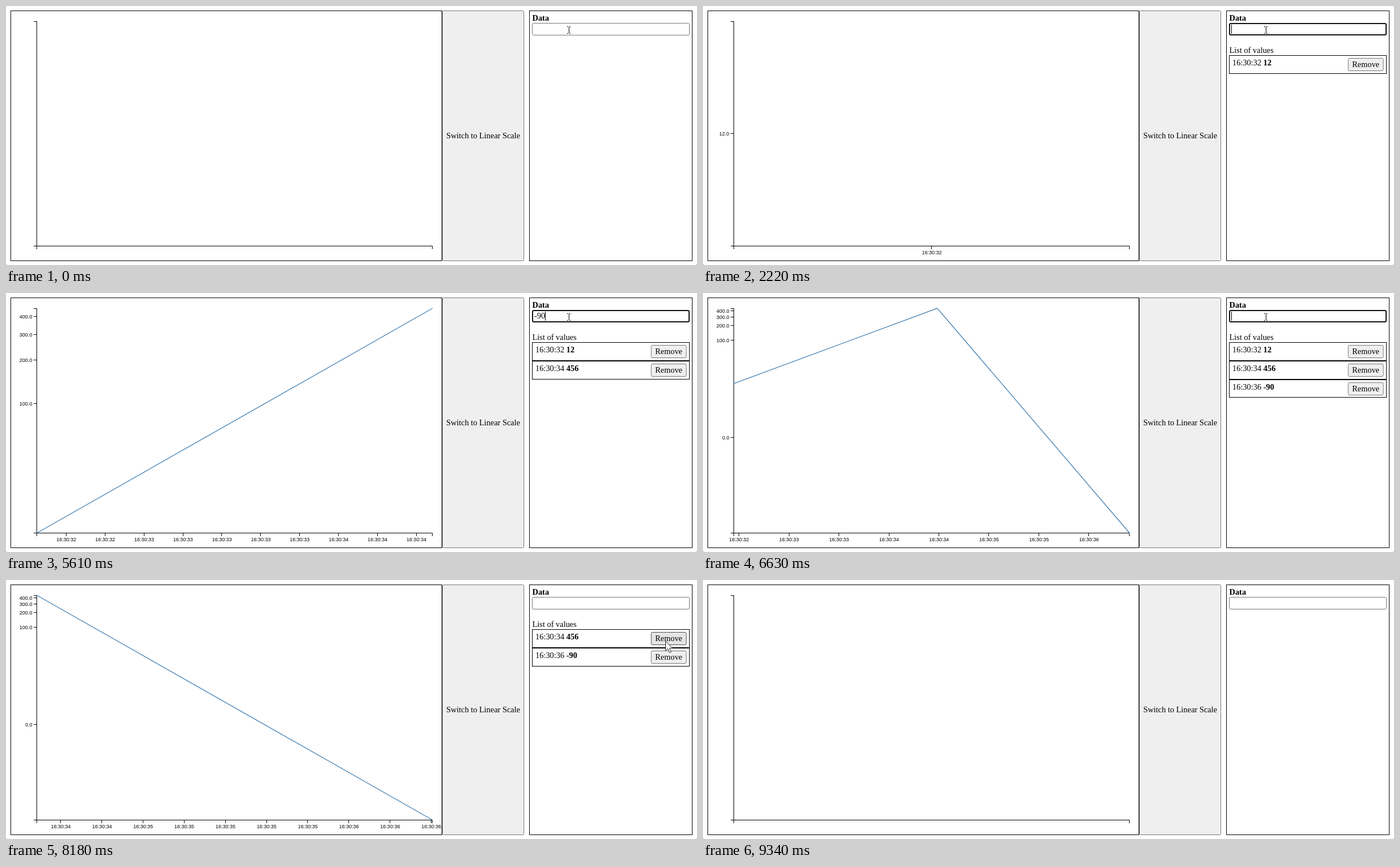
An HTML page for the animation above (9730 ms loop, 1223 by 458 pixels).

```html
<!DOCTYPE html>
<html lang="en">
<head>
<meta charset="utf-8">
<title>Live chart</title>
<style>
  html, body { margin: 0; width: 100%; height: 100%; overflow: hidden; background: #fff; }
  svg { display: block; }
  text { font: 14.4px "Liberation Serif", "Times New Roman", serif; white-space: pre; }
  .bold { font-weight: bold; }
  .tick { font: 9px "Liberation Sans", Arial, sans-serif; }
  .line { fill: none; stroke: #000; shape-rendering: crispEdges; }
</style>
</head>
<body>
<svg id="stage" width="1223" height="458" viewBox="0 0 1223 458"></svg>
<script>
const LOOP = 9730;
const LEFT = 54.5, RIGHT = 755, TOP = 27.5, BOTTOM = 425;
const stage = document.getElementById('stage');

// Each sample: seconds after 16:30 and the value entered.
const A = { s: 32.449, v: 12 }, B = { s: 34.484, v: 456 }, C = { s: 36.407, v: -90 };

// [start time, value] pairs; the last one already started is current.
const tracks = {
  list: [[0, []], [2220, [A]], [4150, [A, B]], [6120, [A, B, C]],
    [8040, [B, C]], [8560, [C]], [8940, []]],
  typed: [[0, ''], [1550, '1'], [1950, '12'], [2220, ''], [3620, '4'], [3750, '45'],
    [3890, '456'], [4150, ''], [5220, '-'], [5480, '-9'], [5610, '-90'], [6120, '']],
  caret: [[0, false], [380, true], [910, false], [1420, true], [2470, false], [2980, true],
    [3490, false], [3620, true], [4440, false], [4950, true], [6120, false], [6630, true],
    [7130, false], [7640, true], [8040, false]],
  focus: [[0, false], [380, true], [8040, false]],
  button: [[0, 'idle'], [7770, 'hover'], [8430, 'active'], [8560, 'hover'],
    [8820, 'active'], [8940, 'idle']],
  pointer: [[0, null], [7400, [1030, 60]], [7520, [1090, 88]], [7640, [1148, 112]],
    [7770, [1165, 107.5]], [8180, [1167, 107.5]], [9070, [1211.5, 411]],
    [9220, [1216, 446]], [9340, null]]
};

const at = (track, t) => track.filter(([start]) => start <= t).pop()[1];

const text = (x, y, str, cls = '', anchor = 'start') =>
  `<text x="${x}" y="${y}" class="${cls}" text-anchor="${anchor}">${str}</text>`;
const path = d => `<path class="line" d="${d}"/>`;
const frame = (x, y, w, h) =>
  `<rect class="line" x="${x + .5}" y="${y + .5}" width="${w - 1}" height="${h - 1}"/>`;
const rounded = (x, y, w, h, fill, stroke, weight = 1) =>
  `<rect x="${x + weight / 2}" y="${y + weight / 2}" width="${w - weight}" height="${h - weight}"
    rx="2" fill="${fill}" stroke="${stroke}" stroke-width="${weight}"/>`;

const clock = s => '16:30:' + Math.floor(s + 1e-6);
const number = v => v.toFixed(1).replace('-', '\u2212');
const symlog = v => Math.sign(v) * Math.log1p(Math.abs(v));

function scale(values, from, to, transform = v => v) {
  const lo = transform(Math.min(...values)), hi = transform(Math.max(...values));
  return v => hi === lo ? (from + to) / 2 : from + (to - from) * (transform(v) - lo) / (hi - lo);
}

function ticks(values, step) {
  const lo = Math.min(...values), hi = Math.max(...values);
  if (lo === hi) return [lo];
  const out = [];
  for (let i = Math.ceil(lo / step); i * step <= hi; i++) out.push(i * step);
  return out;
}

function chart(list) {
  let out = frame(8, 8, 764, 443) +
    path(`M49 27.5H54.5V424.5H49M54.5 430V424.5H754.5V430`);
  if (!list.length) return out;
  const times = list.map(p => p.s), values = list.map(p => p.v);
  const x = scale(times, LEFT, RIGHT), y = scale(values, BOTTOM - .5, TOP - .5, symlog);
  const span = Math.max(...times) - Math.min(...times);
  for (const s of ticks(times, span > 3 ? .5 : .2)) {
    const px = x(s);
    out += path(`M${Math.floor(px) + .5} 425V430`) + text(px + .3, 439, clock(s), 'tick', 'middle');
  }
  for (const v of ticks(values, 100)) {
    const py = y(v);
    out += path(`M49 ${Math.floor(py) + .5}H54`) + text(46.4, py + 3.2, number(v), 'tick', 'end');
  }
  if (list.length > 1) {
    const points = list.map(p => `${x(p.s)},${y(p.v)}`).join(' ');
    out += `<polyline points="${points}" fill="none" stroke="steelblue" stroke-width="1.35"/>`;
  }
  return out;
}

const BUTTON = {
  idle: ['#efefef', '#767676'],
  hover: ['#e5e5e5', '#4f4f4f'],
  active: ['#f5f5f5', '#8d8d8d']
};

function row(sample, i, state) {
  const y = 87 + 33 * i, h = i === 2 ? 32 : 33;
  const top = y + (i ? 5 : 5);
  return frame(931, y, 279, h) +
    text(937, y + 18, `${clock(sample.s)} <tspan class="bold">${sample.v}</tspan>`) +
    rounded(1141.5, top, 63, 23, ...BUTTON[i ? 'idle' : state]) +
    text(1173, y + 21, 'Remove', '', 'middle');
}

function panel(t, list) {
  const typed = at(tracks.typed, t), focus = at(tracks.focus, t);
  let out = frame(926, 8, 289, 443) + text(931.5, 26, 'Data', 'bold') +
    (focus ? rounded(931, 30, 279, 22, '#fff', '#101010', 2)
           : rounded(931, 30, 279, 22, '#fff', '#767676')) +
    text(935, 45, typed);
  if (at(tracks.caret, t)) {
    const width = [...typed].reduce((sum, c) => sum + (c === '-' ? 4.8 : 7.2), 0);
    out += path(`M${Math.floor(935 + width) + .5} 33V49`);
  }
  if (list.length) out += text(931.5, 83, 'List of values');
  const state = at(tracks.button, t);
  return out + list.map((sample, i) => row(sample, i, state)).join('');
}

function cursor(t) {
  if (t < 7400) return path('M993 36.5H995M997 36.5H999M996 37V48M993 48.5H995M997 48.5H999');
  const pos = at(tracks.pointer, t);
  return pos ? `<path transform="translate(${pos})" fill="#fff" stroke="#222"
    d="M.5 .8V17.5L4.4 13.8L7.2 20.6Q8.4 21.8 10.1 19.8L7.3 12.9H12.6Z"/>` : '';
}

function render(t) {
  const list = at(tracks.list, t);
  stage.innerHTML = chart(list) +
    rounded(772, 8, 145, 443, '#efefef', '#767676') +
    text(844.5, 234, 'Switch to Linear Scale', '', 'middle') +
    panel(t, list) +
    '<path d="M0 457h1v1h-1zM1222 457h1v1h-1z" fill="#777"/>' +
    cursor(t);
}

let start;
function loop(now) {
  start ??= now;
  render((now - start) % LOOP);
  requestAnimationFrame(loop);
}
render(0);
requestAnimationFrame(loop);
</script>
</body>
</html>
```
